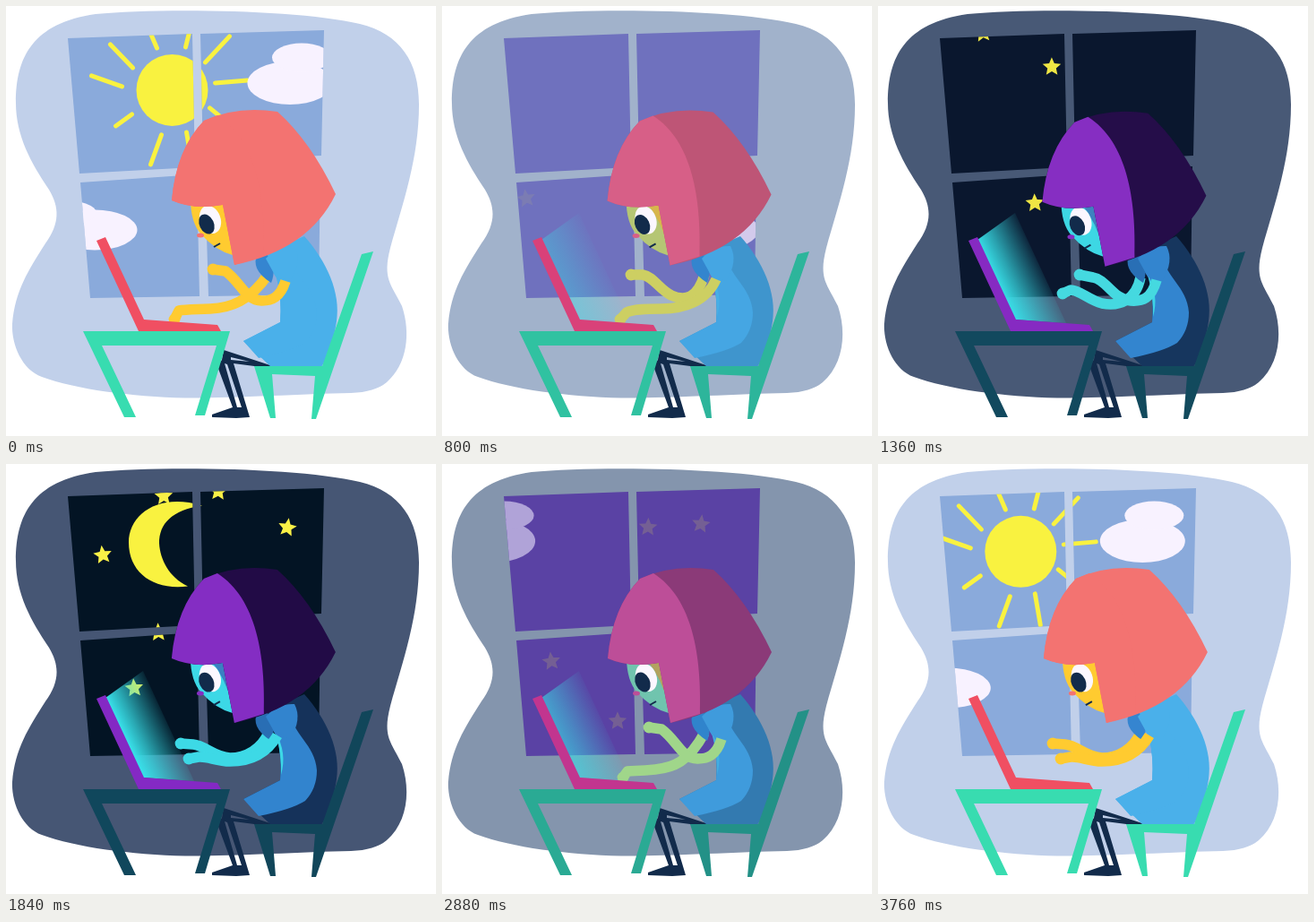
An HTML page that plays this animation: 480x480 px, repeating every 3.84 s.

```html
<!DOCTYPE html>
<html lang="en">
<head>
<meta charset="utf-8">
<title>Day and night at the desk</title>
<style>
html, body { margin: 0; width: 100%; height: 100%; overflow: hidden; background: #fff; }
svg { display: block; width: 100vw; height: 100vh; }
.arm { fill: none; stroke: var(--arm); stroke-width: 11.5; stroke-linejoin: round; }
</style>
</head>
<body>
<svg viewBox="0 0 480 480">
  <defs>
    <clipPath id="panes">
      <path d="M69 36L208 31L211 180L82 187ZM217 31L355 27L352 167L220 173ZM83 197L213 188L216 324L94 326ZM222 187L351 179L349 322L226 324Z"/>
    </clipPath>
    <linearGradient id="beam" gradientUnits="userSpaceOnUse" x1="115" y1="266" x2="163" y2="243">
      <stop offset="0" stop-color="#38dfe8"/>
      <stop offset=".3" stop-color="#38dfe8" stop-opacity=".72"/>
      <stop offset="1" stop-color="#38dfe8" stop-opacity="0"/>
    </linearGradient>
  </defs>

  <path fill="var(--wall)" d="M100 9C170 2 330 4 395 20C440 31 461 62 461 110C461 170 443 220 429 270C420 305 430 310 442 335C452 365 448 400 425 420Q412 431 385 432C330 433 250 438 200 437.5C140 436 78 428 40 414C18 406 6 378 7 355C10 318 25 295 44 265C60 243 60 225 48 205C28 175 11 145 11 108C11 57 30 19 100 9Z"/>

  <g clip-path="url(#panes)">
    <rect width="480" height="480" fill="var(--sky)"/>
    <g id="stars" fill="#f9f046"></g>
    <g id="sun" fill="#f9f240" stroke="#f9f240" stroke-linecap="round">
      <circle r="40" stroke="none"/>
      <path stroke-width="5" d="M48 -8L84 -11M37 -31L64 -60M15 -48L23 -80M-17 -47L-30 -77M-44 -25L-69 -51M-56 -4L-90 -16M-45 27L-63 40M-12 50L-24 83M16 47L22 82M42 20L64 38"/>
    </g>
    <path id="moon" fill="#f9f240" d="M18 47C-20 52 -48 32 -48 -2C-48 -33 -15 -58 34 -43C0 -38 -14 -23 -14 -1C-13 17 -3 37 18 47Z"/>
    <g fill="var(--cloud)">
      <g id="cloudA"><ellipse cx="317" cy="86" rx="47.5" ry="24"/><ellipse cx="330" cy="57.5" rx="33" ry="16"/></g>
      <g id="cloudB"><ellipse cx="99" cy="250" rx="47.5" ry="22.5"/><ellipse cx="60" cy="231" rx="41" ry="15"/></g>
    </g>
  </g>

  <path id="glow" fill="url(#beam)" d="M111 261L153 231L210 354L153 350Z"/>

  <path fill="#122b4b" fill-rule="evenodd" d="M243 384L298 402L285 403L254 399L272 459L257 460L230 459V456L253 448L236 402L241 395ZM244 399L247 400L263 448L258 448ZM251 392L272 397L251 395Z"/>
  <path fill="var(--dress)" d="M282 279L333 257C358 285 374 320 369 352Q364 385 352 403H296L265 374L306 353Q308 330 303 305Q298 290 282 279Z"/>
  <path fill="var(--lit)" d="M288 282L315 272C320 304 345 312 347 342Q347 362 334 376Q318 386 282 393L265 374L306 353Q308 330 303 305Z"/>
  <path fill="var(--rim)" d="M301 300Q314 322 307 347Q308 325 301 300Z"/>
  <path fill="var(--chair)" d="M277 402H353L397 277L410 274L346 461H341L345 413L297 411L301 460H295Z"/>

  <path id="arm1" class="arm"/>
  <circle id="hand1" r="6.4" fill="var(--arm)"/>
  <path fill="var(--sleeve)" d="M281 276Q272 294 296 309Q303 292 291 277Z"/>
  <path fill="var(--lit)" d="M290 282Q303 267 322 268Q331 285 317 307L301 302Z"/>
  <path id="arm2" class="arm"/>
  <circle id="hand2" r="6.4" fill="var(--arm)"/>

  <g id="head">
    <path fill="var(--face)" d="M206 215Q206 242 218 255Q234 273 253 278L262 215Z"/>
    <path fill="var(--shade)" d="M228 218H248L253 270Q246 240 228 218Z"/>
    <ellipse cx="228" cy="238.5" rx="11.5" ry="16" fill="#fbf7ff" transform="rotate(-20 228 238.5)"/>
    <ellipse cx="224" cy="243.5" rx="8" ry="11.5" fill="#122b4b" transform="rotate(-25 224 243.5)"/>
    <ellipse cx="217" cy="256" rx="4" ry="2.5" fill="var(--fringe)"/>
    <path d="M232 269L239 265" stroke="#122b4b" stroke-width="2"/>
    <path fill="var(--hair)" d="M221 128Q258 111 303 118Q340 151 368 210Q338 272 255 289L242 222Q210 228 185 217Q190 160 221 128Z"/>
    <path fill="var(--fringe)" d="M221 128L236 122C280 150 290 215 288 279L255 289L242 222Q210 228 185 217Q190 160 221 128Z"/>
  </g>

  <path fill="var(--laptop)" d="M101 262L111 258L154 350L236 356L240 363H148Z"/>
  <path fill="var(--table)" d="M86 363H250L222 457H211L235 379H107L145 459H132Z"/>
</svg>

<script>
const FRAME = 80, COUNT = 48;
const $ = id => document.getElementById(id);

// Colours along the way from day (0) to night (1).
const stops = [0, .02, .5, .62, .93, 1];
const palette = {
  wall:   'c1d0ea becee8 8495ad 75869f 4d627b 465674',
  sky:    '8aaadb 849fd8 5a42a4 5a287a 1c1f47 031424',
  cloud:  'f8f2ff f5f0ff b0a3d8 9d7dba 6a5a90 4a4a70',
  arm:    'ffcb30 fac83a a0d68a 8fd69a 5ad8cf 3dd9e6',
  face:   'ffcb30 fac83a 70c4ae 55c2c8 3fd3e0 3cd8e6',
  shade:  'ffcb30 fac83a b3a25f 8d9080 4a86b8 3a80c2',
  hair:   'f37371 f07074 8b3a78 6f2d70 2e1250 220b46',
  fringe: 'f37371 f17076 bd4e98 ad44a5 8a30bf 842dc3',
  dress:  '4ab0ea 4ab0ea 337ab0 2b6a9e 1a4068 15325a',
  lit:    '4ab0ea 4ab0ea 3f9bdc 3b95da 3489d2 3284ce',
  rim:    '4ab0ea 4ab0ea 43aee2 42b4e4 3fcbe4 3cd8e6',
  sleeve: '3585d0 3585d0 3084cc 2f82cc 2a72b8 296eb4',
  table:  '38dcb0 36d9ae 2aaa94 239186 174f62 10475c',
  chair:  '38dcb0 36d9ae 239187 1f7f78 165564 11465a',
  laptop: 'f04f62 ef4d63 c2358f b2349a 8a2dbd 8429c4'
};
for (const k in palette)
  palette[k] = palette[k].split(' ').map(h => [0, 2, 4].map(i => parseInt(h.substr(i, 2), 16)));
const glowLevels = [0, .14, .6, .7, .86, 1];
const starLevels = [0, 0, .17, .33, .87, 1];

// Typing: one hand is down while the other is up.
const reach = [
  'M293 299C272 330 250 337 228 338S200 339 193 340L188 350',
  'M293 303C288 328 270 336 250 332C235 328 225 317 215 317L206 321',
  'M293 300C285 326 272 330 256 323C242 316 236 302 224 300L211 300',
  'M293 300C285 318 268 328 250 328C232 327 222 314 209 313L195 312'
];
const reachRight = 'M293 300C275 333 258 339 238 341S215 342 207 343L202 350';
const raise = [
  'M312 307C306 326 296 329 286 329C268 330 262 308 245 296L231 294',
  'M311 306C305 327 295 330 282 329C262 327 255 305 240 303L225 300',
  'M306 305C295 330 270 338 245 338C230 338 215 338 206 342L199 350',
  'M303 303C290 325 270 332 250 332C235 332 225 326 215 327L204 329'
];

// x of each star when the sky is at frame 13, y at the top of its arc.
const stars = [
  [114, 68], [95, 220], [154, 214], [-92, 101], [-24, 36], [37, 30], [-30, 188],
  [-57, 250], [-230, 70], [-171, 65], [-237, 223], [-264, 287], [-338, 220]
];
const starShape = Array.from({ length: 10 }, (_, i) => {
  const r = i % 2 ? 5 : 10.8, a = i * Math.PI / 5;
  return [r * Math.sin(a), -r * Math.cos(a)].map(v => v.toFixed(1)).join();
}).join(' ');
const starEls = stars.map(() => {
  const el = document.createElementNS('http://www.w3.org/2000/svg', 'polygon');
  el.setAttribute('points', starShape);
  return $('stars').appendChild(el);
});

const smooth = u => (u = Math.min(1, Math.max(0, u)), u * u * (3 - 2 * u));
const move = (el, x, y, turn = 0) =>
  el.setAttribute('transform', `translate(${x} ${y}) rotate(${turn})`);
const arcY = x => 90 + (x - 248) ** 2 / 1000;

function sampler(p) {
  let i = 0;
  while (i < 4 && p > stops[i + 1]) i++;
  const u = (p - stops[i]) / (stops[i + 1] - stops[i]);
  return list => list[i] + (list[i + 1] - list[i]) * u;
}

function setArm(n, d) {
  $('arm' + n).setAttribute('d', d);
  const [x, y] = d.split('L')[1].split(' ');
  move($('hand' + n), x, y);
}

function draw(f) {
  const night = smooth((f - 6) / 12) - smooth((f - 30) / 12);
  const at = sampler(night);
  for (const k in palette) {
    const rgb = [0, 1, 2].map(c => Math.round(at(palette[k].map(v => v[c]))));
    document.documentElement.style.setProperty('--' + k, `rgb(${rgb})`);
  }
  $('glow').setAttribute('opacity', at(glowLevels));
  $('stars').setAttribute('opacity', at(starLevels));

  const s = f < 24 ? f : f - COUNT;
  const sunX = 185.5 + 26.2 * s, moonX = 185 + 26.2 * (f - 23);
  move($('sun'), sunX, arcY(sunX));
  move($('moon'), moonX, arcY(moonX) - 4.5);
  move($('cloudA'), 21.7 * s, 0);
  move($('cloudB'), 20.7 * s, 0);
  stars.forEach(([x, y], i) => {
    const px = x + 20 * (f - 13);
    move(starEls[i], px, y + (px - 170) ** 2 / 7000, (px - 200) / 12);
  });

  const step = f % 4;
  setArm(1, f % 8 === 4 ? reachRight : reach[step]);
  setArm(2, raise[step]);

  const nod = (1 - Math.cos(f * Math.PI / 6)) / 2;
  move($('head'), -1.7 * nod, 1.8 * nod);
}

let last = -1;
function tick() {
  const f = Math.floor(performance.now() / FRAME) % COUNT;
  if (f !== last) draw(last = f);
  requestAnimationFrame(tick);
}
tick();
</script>
</body>
</html>
```
